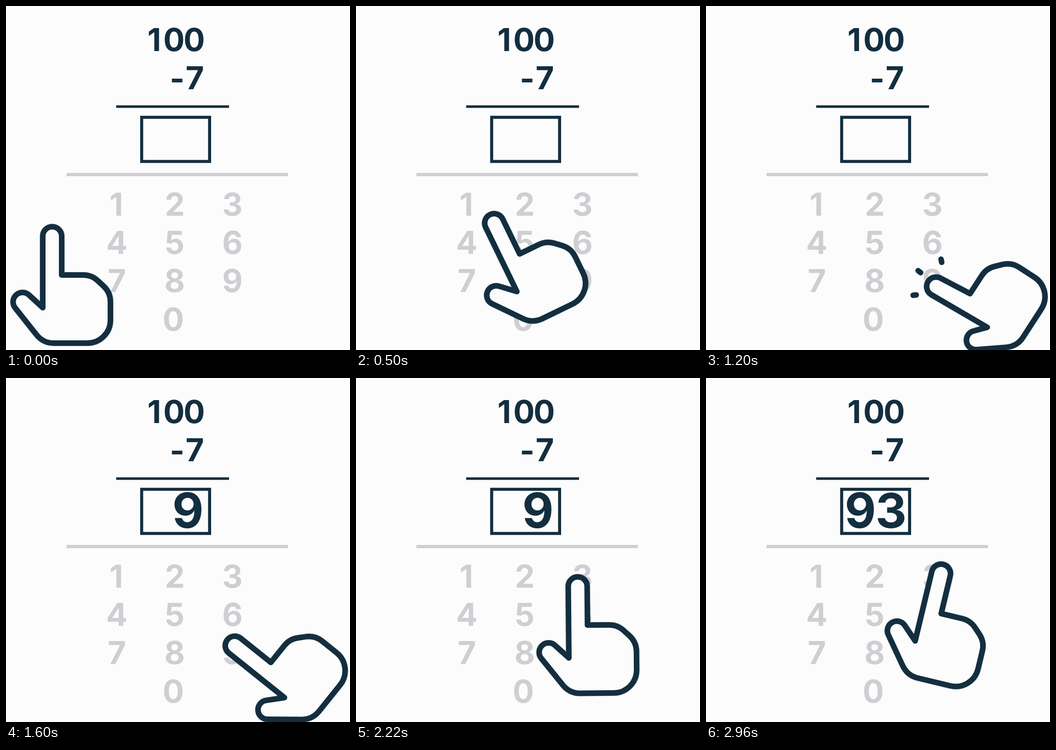
Animation of 748 by 748 pixels, one loop 3 s. Source, as an HTML page with a canvas:

```html
<!DOCTYPE html>
<html lang="en">
<head>
<meta charset="utf-8">
<title>Subtraction keypad</title>
<style>
  html, body { margin: 0; width: 100%; height: 100%; overflow: hidden; background: #fcfcfc; }
  canvas { display: block; width: 100vmin; height: 100vmin; }
</style>
</head>
<body>
<canvas id="stage" width="748" height="748"></canvas>
<script>
const ctx = document.getElementById('stage').getContext('2d');
const LOOP = 3000, STEP = 20;
const BG = '#fcfcfc', INK = '#132e3f', GREY = '#cfcfd3';
const PALM = { x: 150, y: 660 };

// time, palm x, palm y, angle in degrees
const PATH = [
  [0, 150, 660, 0],
  [250, 222, 630, -9],
  [480, 400, 594, -24.6],
  [540, 442, 594, -28.3],
  [720, 563.5, 626, -38],
  [880, 629, 640, -47.5],
  [1040, 656.7, 642, -53.8],
  [1470, 656.7, 642, -53.8],
  [1620, 650, 643, -50],
  [1960, 581.5, 640, -22.5],
  [2160, 541, 621, -6],
  [2300, 526, 600, 6.5],
  [2420, 522, 592, 13.5],
  [LOOP, 522, 592, 13.5]
];

// finger down, finger up, spark start, sideways spark shift, answer time
const CLICKS = [
  { down: 1050, up: 1365, burst: 1167, shift: -6, answer: 1290 },
  { down: 2400, up: 2700, burst: 2502, shift: 7, answer: 2625 }
];

// start x, start y, direction in degrees from straight up
const SPARKS = [[62, 489, -40], [107, 471, 5], [150, 497, 44]];

const rad = deg => deg * Math.PI / 180;
const clamp = v => Math.max(0, Math.min(1, v));
const smooth = v => { v = clamp(v); return v * v * (3 - 2 * v); };

function slope(i, k) {
  const a = PATH[i - 1], b = PATH[i], c = PATH[i + 1];
  if (!a || !c || (b[k] - a[k]) * (c[k] - b[k]) <= 0) return 0;
  return (c[k] - a[k]) / (c[0] - a[0]);
}

function track(t, k) {
  let i = 0;
  while (i < PATH.length - 2 && t >= PATH[i + 1][0]) i++;
  const a = PATH[i], b = PATH[i + 1], d = b[0] - a[0], u = (t - a[0]) / d;
  const u2 = u * u, u3 = u2 * u;
  return (2 * u3 - 3 * u2 + 1) * a[k] + (u3 - 2 * u2 + u) * d * slope(i, k)
    + (3 * u2 - 2 * u3) * b[k] + (u3 - u2) * d * slope(i + 1, k);
}

function pressAt(t) {
  return CLICKS.reduce((p, c) =>
    p + smooth((t - c.down) / 110) - smooth((t - c.up) / 260), 0);
}

// draws one character with its visible width centred on cx
function glyph(ch, cx, base, size, color) {
  ctx.font = `700 ${size}px Inter, "Liberation Sans", sans-serif`;
  ctx.fillStyle = color;
  const m = ctx.measureText(ch);
  ctx.fillText(ch, cx + (m.actualBoundingBoxLeft - m.actualBoundingBoxRight) / 2, base);
}

function bar(x, y, w, h, color) {
  ctx.fillStyle = color;
  ctx.fillRect(x, y, w, h);
}

function drawSum(t) {
  glyph('1', 322, 98, 69, INK);
  glyph('0', 365.5, 98, 69, INK);
  glyph('0', 409.5, 98, 69, INK);
  glyph('-', 372, 183, 69, INK);
  glyph('7', 410.5, 181, 69, INK);
  bar(239.5, 216, 245.5, 5.5, INK);
  ctx.strokeStyle = INK;
  ctx.lineWidth = 6.6;
  ctx.lineJoin = 'miter';
  ctx.strokeRect(295, 242, 147.7, 96);

  if (t >= CLICKS[1].answer) {
    glyph('9', 335.5, 326, 105, INK);
    glyph('3', 402.5, 326, 105, INK);
  } else if (t >= CLICKS[0].answer) {
    glyph('9', 395.5, 326, 105, INK);
  }
}

function drawKeypad() {
  bar(131.5, 363, 481.5, 7, GREY);
  for (let n = 1; n <= 9; n++) {
    const col = (n - 1) % 3, row = Math.floor((n - 1) / 3);
    glyph(String(n), (n === 1 ? 239.5 : 241) + col * 125.8, 456 + row * 83.2, 69, GREY);
  }
  glyph('0', 364, 705.5, 69, GREY);
}

function handShape(p) {
  const fx = 100.5 - 6.5 * p, fy = 500.5 + 14 * p;
  const tx = 36 + 7 * p, ty = 643.5 + 7 * p;
  const path = new Path2D();
  path.moveTo(80, 656);
  path.lineTo(fx - 20.5, fy);
  path.arc(fx, fy, 20.5, Math.PI, 0);
  path.lineTo(121, 585);
  path.lineTo(168, 585);
  path.quadraticCurveTo(186, 585, 199, 597);
  path.lineTo(212, 609);
  path.quadraticCurveTo(227, 623, 227, 643);
  path.lineTo(227, 683);
  path.arc(177, 683, 50, 0, Math.PI / 2);
  path.lineTo(104, 733);
  path.quadraticCurveTo(80, 733, 65, 713);
  path.arc(tx, ty, 20.5, rad(141), rad(313));
  path.closePath();
  return path;
}

function drawSparks(t) {
  for (const c of CLICKS) {
    const u = (t - c.burst) / 220;
    if (u <= 0 || u >= 1) continue;
    for (const [x, y, deg] of SPARKS) {
      const dx = Math.sin(rad(deg)), dy = -Math.cos(rad(deg));
      const near = 54 * u * u, far = 54 * u;
      ctx.beginPath();
      ctx.moveTo(x + c.shift + dx * near, y + dy * near);
      ctx.lineTo(x + c.shift + dx * far, y + dy * far);
      ctx.stroke();
    }
  }
}

function drawHand(t) {
  const p = pressAt(t), shape = handShape(p);
  ctx.save();
  ctx.translate(track(t, 1) - 3.7 * p, track(t, 2));
  ctx.rotate(rad(track(t, 3) - 3.3 * p));
  ctx.translate(-PALM.x, -PALM.y);
  ctx.lineJoin = ctx.lineCap = 'round';
  ctx.strokeStyle = 'rgba(19, 46, 63, 0.35)';
  ctx.lineWidth = 13.5;
  ctx.stroke(shape);
  ctx.fillStyle = BG;
  ctx.fill(shape);
  ctx.strokeStyle = INK;
  ctx.lineWidth = 12;
  ctx.stroke(shape);
  drawSparks(t);
  ctx.restore();
}

function draw(t) {
  bar(0, 0, 748, 748, BG);
  drawSum(t);
  drawKeypad();
  drawHand(t);
}

const start = performance.now();
function frame() {
  const t = (performance.now() - start) % LOOP;
  draw(Math.min(Math.floor(t / STEP) * STEP, LOOP - 2 * STEP));
  requestAnimationFrame(frame);
}
frame();
</script>
</body>
</html>
```
